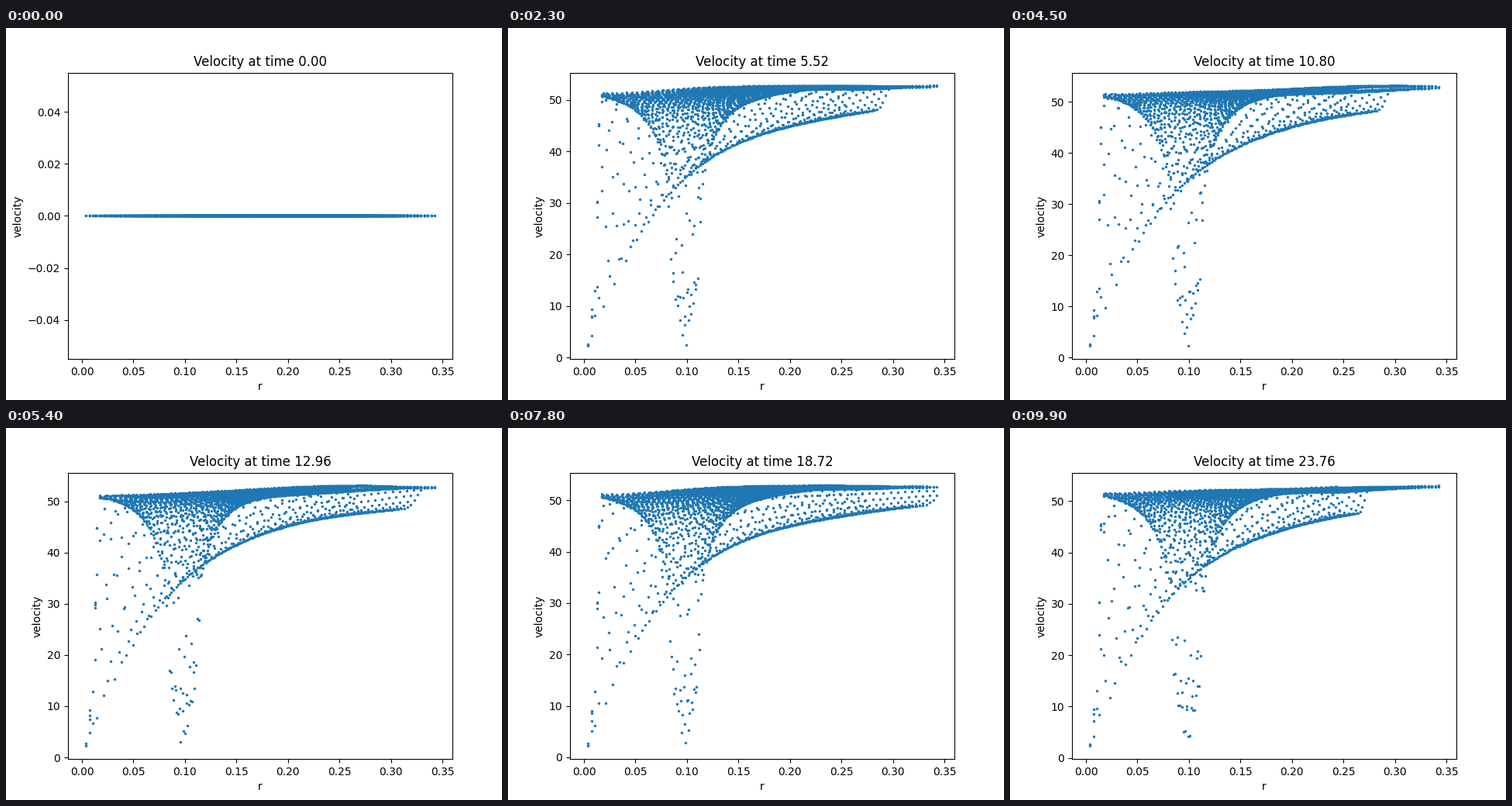
A matplotlib script for the animation above (10 s loop, 640 by 480 pixels).

```python
import numpy as np
import matplotlib.pyplot as plt
from matplotlib.animation import FuncAnimation

FRAMES = 100
DT = 0.24
STEP = 0.004897    # grid spacing
CORE = 0.098       # distance of each core from the centre
VMAX = 53.3
PHI0, TURN = np.radians([-15.3, 30.888])   # start angle, turn per frame

# The field is point-symmetric, so half of the 100 x 100 grid is enough.
axis = (np.arange(100) - 49.5) * STEP
X, Y = (a.ravel() for a in np.meshgrid(axis, axis[50:]))
R = np.hypot(X, Y)


def smooth(x, start, end):
    u = np.clip((x - start) / (end - start), 0, 1)
    return u * u * (3 - 2 * u)


def rise(x, scale):
    return x / np.hypot(x, scale)


def core_speed(rho):
    """Speed around a single core, slowed down in its middle."""
    return VMAX * rise(rho, 0.019 + 0.08 * rho) * (
        0.5 + 0.5 * smooth(rho, 0.0115, 0.018))


def velocity(i):
    phi = PHI0 + TURN * i
    along = X * np.cos(phi) + Y * np.sin(phi)
    across = Y * np.cos(phi) - X * np.sin(phi)
    s, x = np.abs(along), np.abs(across)
    rho = np.hypot(s, x - CORE)

    # Weak waves, and a small difference between leading and trailing sides
    wave = np.sin(30 * rho + 0.105 * i - 11.19) * np.exp(-2.5 * rho)
    tilt = along * across / R ** 2
    speed = core_speed(rho) + smooth(rho, 0, 0.1) * (0.4 * wave + 0.5 * tilt)

    # Opposing flows cancel inside a sheet that widens outwards.
    width = 0.009 + 0.16 * s
    jump = np.sin(np.pi / 2 * np.clip(x / width, 0, 1)) ** (1 + 100 * s ** 2)
    jump *= np.maximum(np.minimum(24 * R, 1), smooth(R, 0.008, 0.016))
    tang = rise(np.hypot(s, 0.0025), 0.1 + 0.1 * s)
    return speed * np.sqrt(tang ** 2 + (1 - tang ** 2) * jump ** 2)


fig, ax = plt.subplots(figsize=(6.4, 4.8), dpi=100)
dots, = ax.plot(R, np.zeros_like(R), "o", ms=1, mew=1.5, color="tab:blue")
ax.set_xlabel("r")
ax.set_ylabel("velocity")


def update(i):
    dots.set_ydata(velocity(i) if i else np.zeros_like(R))
    ax.relim()
    ax.autoscale_view()
    ax.set_title(f"Velocity at time {i * DT:.2f}")
    return dots,


anim = FuncAnimation(fig, update, frames=FRAMES, interval=1000 // 10,
                     repeat=True, repeat_delay=0, blit=False)
plt.show()
```
